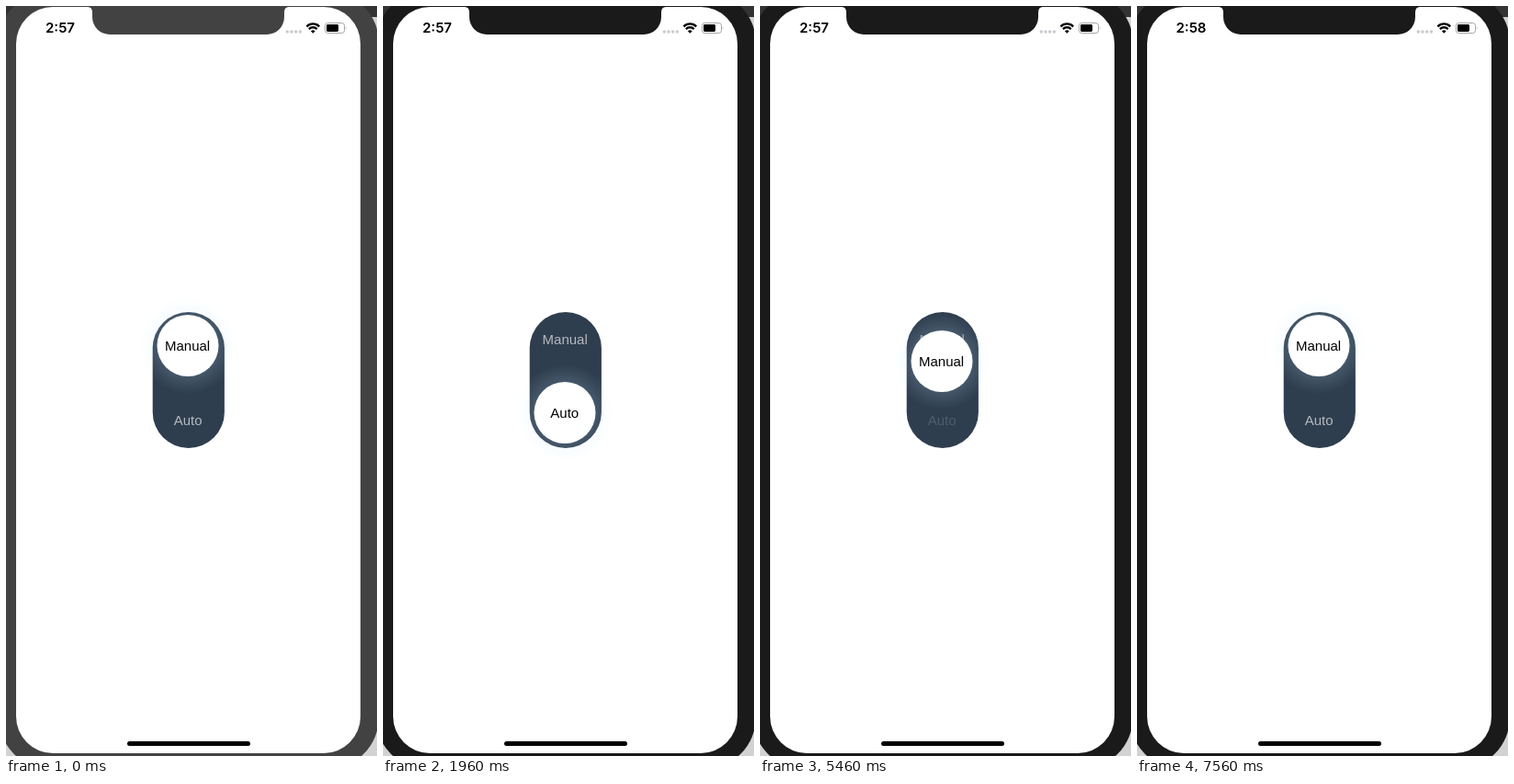
Animation of 404x816 px, one loop 8000 ms. Source, as an HTML page:

```html
<!DOCTYPE html>
<html lang="en">
<head>
<meta charset="utf-8">
<title>Mode switch</title>
<style>
  html, body { margin: 0; width: 100%; height: 100%; overflow: hidden; background: #d2d2d2; }
  svg { display: block; width: 100%; height: 100%; }
  text { font: 15px "Liberation Sans", Arial, sans-serif; text-anchor: middle; }
  .clock { font: 600 15px Inter, "Open Sans", sans-serif; text-anchor: start; }
  .rest { fill: #fff; }

  .bezel, .knob, .rest, .label, .clock { animation: 8s step-end infinite; }
  .bezel { animation-name: bezel; }
  .knob { animation-name: slide; }
  .rest.manual { animation-name: rest-manual; }
  .rest.auto { animation-name: rest-auto; }
  .label.manual { animation-name: label-manual; }
  .label.auto { animation-name: label-auto; }
  .before { animation-name: before; }
  .after { animation-name: after; }

  @keyframes bezel {
    0% { fill: #424242; }
    22.75%, 100% { fill: #1a1a1a; }
  }
  @keyframes slide {
    0%, 46.375%, 94.5%, 100% { transform: translateY(0); }
    22.75% { transform: translateY(14px); }
    23.625% { transform: translateY(68px); }
    24.5%, 69.125% { transform: translateY(73px); }
    44.625%, 92.75% { transform: translateY(58px); }
    45.5%, 93.625% { transform: translateY(5px); }
    68.25% { transform: translateY(17px); }
  }
  @keyframes rest-manual {
    0%, 46.375%, 94.5%, 100% { opacity: 0; }
    22.75% { opacity: .4; }
    23.625%, 24.5%, 69.125% { opacity: .64; }
    44.625%, 92.75% { opacity: .15; }
    45.5%, 93.625% { opacity: 0; }
    68.25% { opacity: .5; }
  }
  @keyframes rest-auto {
    0%, 45.5%, 93.625%, 100% { opacity: .64; }
    22.75%, 68.25% { opacity: .15; }
    23.625%, 69.125% { opacity: 0; }
    44.625%, 92.75% { opacity: .45; }
  }
  @keyframes label-manual {
    0%, 45.5%, 93.625%, 100% { opacity: 1; }
    23.625%, 69.125% { opacity: 0; }
  }
  @keyframes label-auto {
    0%, 45.5%, 93.625%, 100% { opacity: 0; }
    23.625%, 69.125% { opacity: 1; }
  }
  @keyframes before {
    0% { opacity: 1; }
    82.25%, 100% { opacity: 0; }
  }
  @keyframes after {
    0% { opacity: 0; }
    82.25%, 100% { opacity: 1; }
  }
</style>
</head>
<body>
<svg viewBox="0 0 404 816">
  <defs>
    <radialGradient id="glow">
      <stop offset=".62" stop-color="#bfe6ff" stop-opacity=".16"/>
      <stop offset=".8" stop-color="#bfe6ff" stop-opacity=".08"/>
      <stop offset="1" stop-color="#bfe6ff" stop-opacity="0"/>
    </radialGradient>
  </defs>

  <!-- phone -->
  <rect width="404" height="12" fill="#333"/>
  <rect class="bezel" x="-8" y="-16" width="414" height="846" rx="56"/>
  <path fill="#fff" d="M11 41A40 40 0 0 1 51 1H89Q94 1 94 7V12A19 19 0 0 0 113 31H284A19 19 0 0 0 303 12V7Q303 1 308 1H346A40 40 0 0 1 386 41V773A40 40 0 0 1 346 813H51A40 40 0 0 1 11 773Z"/>

  <!-- status bar -->
  <text class="clock before" x="43" y="29">2:57</text>
  <text class="clock after" x="42.5" y="29">2:58</text>
  <g fill="#c9cccf">
    <circle cx="306.3" cy="28" r="1.8"/>
    <circle cx="311" cy="28" r="1.8"/>
    <circle cx="315.7" cy="28" r="1.8"/>
    <circle cx="320.4" cy="28" r="1.8"/>
  </g>
  <g fill="none" stroke="#000" stroke-width="2.3">
    <path d="M327.4 22.4A9.6 9.6 0 0 1 341.2 22.4"/>
    <path d="M329.9 25.1A6.2 6.2 0 0 1 338.7 25.1"/>
  </g>
  <path d="M331.9 27.2A3.6 3.6 0 0 1 336.7 27.2L334.3 29.8Z"/>
  <rect x="347.5" y="18.5" width="21" height="11" rx="2.8" fill="none" stroke="#a4a4a4"/>
  <rect x="349" y="20" width="13" height="8" rx="1.4"/>
  <path d="M369.8 22.3Q371.4 24 369.8 25.8Z" fill="#a4a4a4"/>

  <!-- switch -->
  <rect x="159.7" y="333" width="78.2" height="148" rx="39.1" fill="#2f3e4f"/>
  <text class="rest manual" x="198.2" y="368">Manual</text>
  <text class="rest auto" x="198.2" y="456">Auto</text>
  <g class="knob">
    <circle cx="198" cy="369.5" r="53" fill="url(#glow)"/>
    <circle cx="198" cy="369.5" r="33.5" fill="#fff"/>
    <text class="label manual" x="197.6" y="374.5">Manual</text>
    <text class="label auto" x="197.8" y="374.5">Auto</text>
  </g>

  <rect x="132" y="800" width="134" height="5" rx="2.5"/>
</svg>
</body>
</html>
```
